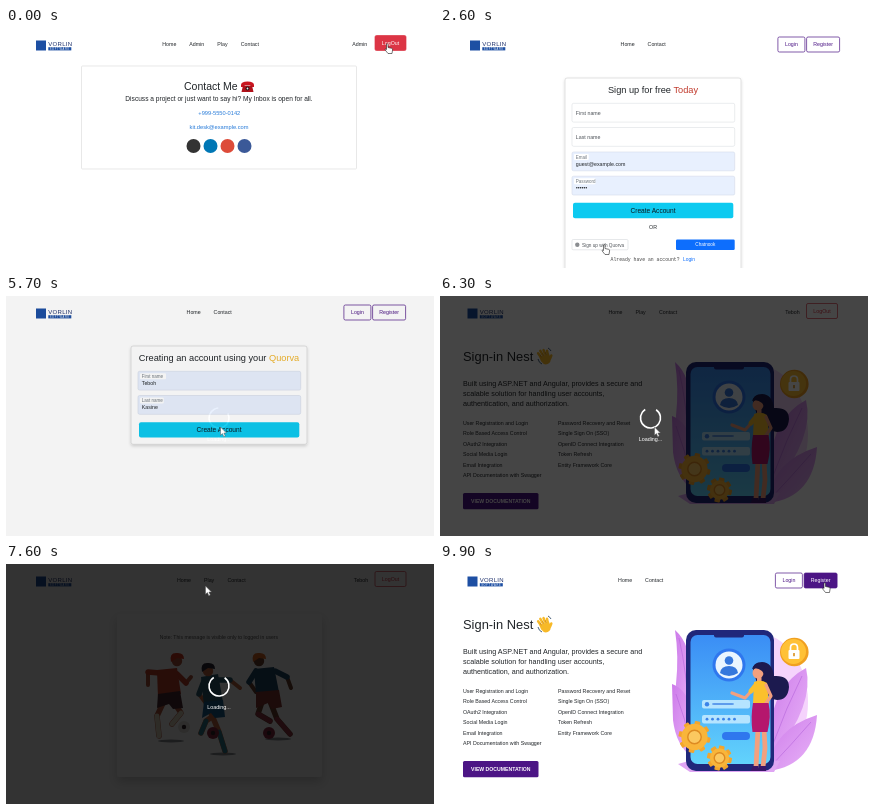
An HTML page for the animation above (10 s loop, 428 by 240 pixels).

```html
<!DOCTYPE html>
<html lang="en">
<head>
<meta charset="utf-8">
<title>Sign-up walkthrough</title>
<style>
html, body { margin: 0; width: 100%; height: 100%; overflow: hidden; background: #fff; }
svg { display: block; width: 100vw; height: 100vh; font-family: "Liberation Sans", Arial, sans-serif; }
text { white-space: pre; }
.mono { font-family: "Liberation Mono", "Courier New", monospace; }
</style>
</head>
<body>
<svg id="stage" viewBox="0 0 428 240"></svg>
<script>
const LOOP = 10000, STEP = 100, SPIN = 650;
const PURPLE = '#4c1585', RED = '#dc3545', INK = '#212529';
const BASE = 5.27;

// ---------- drawing helpers ----------
const text = (x, y, s, size = BASE, fill = INK, extra = '') =>
  `<text x="${x}" y="${y}" font-size="${size}" fill="${fill}" ${extra}>${s}</text>`;
const mid = (x, y, s, size, fill, extra = '') => text(x, y, s, size, fill, `text-anchor="middle" ${extra}`);
const box = (x, y, w, h, fill = 'none', line = 'none', r = 2, extra = '') =>
  `<rect x="${x}" y="${y}" width="${w}" height="${h}" rx="${r}" fill="${fill}" stroke="${line}" ${extra}/>`;
const dot = (x, y, r, fill, extra = '') => `<circle cx="${x}" cy="${y}" r="${r}" fill="${fill}" ${extra}/>`;
const path = (d, fill = 'none', extra = '') => `<path d="${d}" fill="${fill}" ${extra}/>`;
const limb = (pts, color, w) =>
  `<polyline points="${pts}" fill="none" stroke="${color}" stroke-width="${w}" stroke-linecap="round" stroke-linejoin="round"/>`;
const button = (x, y, w, h, label, fill, line, ink) =>
  box(x, y, w, h, fill, line, 1.5, 'stroke-width=".7"') + mid(x + w / 2, y + h / 2 + 1.9, label, BASE, ink);
const group = (id, body) => `<g id="${id}" display="none">${body}</g>`;

// ---------- header ----------
function header(links, dx = 0) {
  return `<g transform="translate(${dx} 0)">` +
    box(30, 12.5, 10, 10, '#1d4fa3', 'none', 0) +
    text(42.3, 18, 'VORLIN', 6, '#1c2f6b', 'letter-spacing=".3"') +
    box(42.3, 19.2, 23, 3.2, '#1d4fa3', 'none', 0) +
    mid(53.8, 21.8, 'SOFTWARE', 2.6, '#fff', 'letter-spacing=".7"') + '</g>' +
    links.map(([x, s]) => text(x + dx, 18.2, s)).join('');
}
const guestLinks = [[180.6, 'Home'], [207.6, 'Contact']];
const userLinks = [[171, 'Home'], [198, 'Play'], [221.5, 'Contact'], [347.8, 'Teboh']];
const adminLinks = [[156.3, 'Home'], [183.2, 'Admin'], [211.3, 'Play'], [234.8, 'Contact'], [346.3, 'Admin']];
const logout = (dx = 0) => button(369 + dx, 7.5, 31, 15, 'LogOut', 'none', RED, RED);

function guestHeader(dx = 0, fill = 'none', ink = PURPLE) {
  return header(guestLinks, dx) +
    button(337.9 + dx, 9, 27, 15, 'Login', 'none', PURPLE, PURPLE) +
    button(366.6 + dx, 9, 33, 15, 'Register', fill, PURPLE, ink);
}

// ---------- contact ----------
const phone = path('M235 57q0-3.500 6.500-3.500t6.500 3.500v2h-3.200l-.6-2h-5.400l-.6 2H235z', '#c91620') +
  path('M237 57.500h9l1.500 6.500h-12z', '#b0121b') + dot(241.5, 60.5, 2, '#2b1214') + dot(241.5, 60.5, .9, '#eee');
const contact = box(75.5, 38, 275, 103, '#fff', '#dedede', 1, 'stroke-width=".7"') +
  text(178, 62.2, 'Contact Me', 10.5) + phone +
  mid(213, 73, 'Discuss a project or just want to say hi? My Inbox is open for all.', 6.6) +
  mid(213.3, 87, '+999-5550-0142', 5.7, '#2479d8') +
  mid(213, 101.2, 'kit.desk@example.com', 5.7, '#2479d8') +
  ['#333333', '#0077b5', '#dd4b39', '#3b5998'].map((c, i) => dot(187.5 + i * 17, 118, 7, c)).join('');

// ---------- forms ----------
function field(y, label, value) {
  const full = value !== undefined;
  return box(132, y, 162.7, 18.8, full ? '#e8f0fe' : '#fff', full ? '#d3dbe9' : '#dcdfe3', 1.6, 'stroke-width=".6"') +
    (full
      ? box(134, y + 2, label.length * 2.25 + 3.5, 6, '#fff', 'none', 1) +
        text(135.8, y + 6.8, label, 4.5, '#6c757d') + text(135.8, y + 13.6, value)
      : text(135.8, y + 11.2, label, BASE, '#4c5157'));
}
const card = h => box(125, 50, 176, h, '#fff', '#d4d4d4', 2, 'stroke-width=".7" filter="url(#shade)"');
const create = y => box(133, y, 160.3, 15.4, '#0dcaf0') + mid(213, y + 10.1, 'Create Account', 6.6, '#0b1a20');
const title = (a, b, color) =>
  `<text x="213" y="64.6" font-size="9.22" fill="${INK}" text-anchor="middle">${a} <tspan fill="${color}">${b}</tspan></text>`;

const register = card(220) + title('Sign up for free', 'Today', '#c0392b') +
  field(75.3, 'First name') + field(99.5, 'Last name') +
  field(124, 'Email', 'guest@example.com') + field(148.2, 'Password', '') +
  Array.from({ length: 6 }, (_, i) => dot(136.8 + i * 1.9, 159.7, .75, INK)).join('') +
  create(174.8) + mid(213, 201.2, 'OR') +
  box(132, 211.5, 56, 10.3, '#fff', '#d5d8dc', 1.2, 'stroke-width=".6"') + dot(137.3, 216.8, 2.2, '#8a8d90') +
  text(142, 218.5, 'Sign up with Quorva', 4.7, '#50555a') +
  box(236, 211.5, 58.7, 10.5, '#0d6efd', 'none', 1.2) + mid(265.3, 218.4, 'Chatnook', 4.7, '#fff') +
  text(170.5, 233, 'Already have an account?', 4.8, '#444', 'class="mono"') +
  text(243, 233, 'Login', 4.9, '#0d6efd');

const social = card(98.3) + title('Creating an account using your', 'Quorva', '#f0b429') +
  group('first0', field(75.3, 'First name')) + group('first1', field(75.3, 'First name', 'Teboh')) +
  group('last0', field(99.5, 'Last name')) + group('last1', field(99.5, 'Last name', 'Kasine')) +
  create(126.2);

// ---------- home ----------
function gear(x, y, r) {
  const teeth = Array.from({ length: 8 }, (_, i) =>
    `<rect x="${x - 2.8}" y="${y - r}" width="5.600" height="6" rx="1" fill="#f3a52c" transform="rotate(${i * 45 + 12} ${x} ${y})"/>`);
  return teeth.join('') + dot(x, y, r - 2.8, '#f9b53a') +
    dot(x, y, r * .42, '#fbc860', 'stroke="#dd8a22" stroke-width="1.400"');
}
const leaf = (d, vein) => path(d, 'url(#leaf)') + path(vein, 'none', 'stroke="#b565dc" stroke-width=".6"');
const wave = `<g transform="rotate(-22 105 61)" stroke-linecap="round">` +
  [[101, 59, 100, 55], [103.6, 58, 103, 53.5], [106.2, 58, 106.2, 54], [108.6, 59, 109.2, 56]]
    .map(([a, b, c, d]) => `<path d="M${a} ${b}L${c} ${d}" stroke="#f7b928" stroke-width="2.500"/>`).join('') +
  path('M99.700 59h10.200v4.500q-1 5-5 5t-5.200-5z', '#f7b928') +
  path('M109 64.500l2.400-2.500', 'none', 'stroke="#f7b928" stroke-width="2.500"') +
  path('M101.500 59.500v-2M104.200 59v-2M107 59v-2', 'none', 'stroke="#b97012" stroke-width=".5"') + '</g>' +
  path('M98 63q1 4 4 5M111 55q-1-2-3-3', 'none', 'stroke="#35506b" stroke-width=".9"');

const woman =
  limb('318,164 317,184 316,203', '#f2a07f', 4.8) + limb('324,164 325,184 323,203', '#f2a07f', 4.8) +
  path('M313 202h5.500v5h-8zM320 202h6v5h-8z', '#3c1768') +
  path('M313 106q0-8 9-8 10 0 12 14 15-1 15 11-1 13-12 13-9 0-11-11l-9-6z', '#1c1a4f') +
  limb('316,122 305,134 292,129', '#f2a07f', 3.2) + dot(318, 109, 5.5, '#f2a07f') + box(317, 112, 4.5, 7, '#f2a07f') +
  path('M312 105q2-7 9-6 5 2 5 14l-4-6q-5-4-10-2z', '#1c1a4f') +
  path('M314 118q7-3 13 1l2 21h-16z', '#fbc02d') + limb('316,121 311,127', '#fbc02d', 5) +
  limb('326,121 331,132 324,142', '#f2a07f', 3.2) +
  path('M313 139h15.500q3 13-1 29h-15q-2-15 .5-29z', '#b5176d');

const art =
  '<ellipse cx="316" cy="138" rx="52" ry="69" fill="#f5d3fc"/>' +
  leaf('M235 66q16 14 16 46v50q-15-12-15-42 3-28-1-54z', 'M239 74q8 35 10 78') +
  leaf('M232 120q17 6 20 32l1 42q-17-12-20-38z', 'M236 130q10 25 14 52') +
  leaf('M330 166q4-45 36-62 9 36-32 88z', 'M362 112q-16 32-29 68') +
  leaf('M328 204q5-39 49-53-3 50-48 56z', 'M371 158q-20 23-40 44') +
  path('M238 200q34-12 102-3l-6 11h-84z', '#dfa5f3') +
  box(246, 66, 88, 141, '#20277a', 'none', 10) + box(250.5, 71, 80, 129, 'url(#screen)', 'none', 7) +
  box(274, 69, 30, 4.5, '#20277a') +
  dot(289, 101, 16.5, '#2f77ee') + dot(289, 101, 13.5, '#eaf5ff') + dot(289, 96.5, 4.3, '#3577dc') +
  path('M280 109q1-7 9-7t9 7q-9 6-18 0z', '#3577dc') +
  box(262, 136, 48, 8.5, '#b5e4ff') + dot(267, 140.2, 2.2, '#3b83e8') + box(272, 139, 22, 2, '#5e9cec') +
  box(262, 151, 48, 8.5, '#b5e4ff') +
  Array.from({ length: 6 }, (_, i) => dot(267 + i * 5.5, 155.2, 1.4, '#3b83e8')).join('') +
  box(282, 168, 28, 8, '#2f77ee', 'none', 4) +
  dot(354.3, 88, 14.3, '#f0a021') + dot(353.5, 87.5, 12.5, '#ffc136') +
  path('M350.500 87v-3.500q0-3.500 3.500-3.500t3.500 3.500V87', 'none', 'stroke="#fff" stroke-width="1.700"') +
  box(348.5, 86, 11, 9, '#fff', 'none', 1) + box(353.2, 89, 1.6, 3.2, '#d78d18', 'none', .5) +
  gear(254.5, 173, 16) + gear(279.5, 194, 12.5) + woman;

const features = [
  ['User Registration and Login', 'Role Based Access Control', 'OAuth2 Integration',
    'Social Media Login', 'Email Integration', 'API Documentation with Swagger'],
  ['Password Recovery and Reset', 'Single Sign On (SSO)', 'OpenID Connect Integration',
    'Token Refresh', 'Entity Framework Core']
];
const home = text(23, 65, 'Sign-in Nest', 12.9) + wave +
  ['Built using ASP.NET and Angular, provides a secure and',
    'scalable solution for handling user accounts,', 'authentication, and authorization.']
    .map((s, i) => text(23, 90.2 + i * 9.7, s, 7.2)).join('') +
  features.map((col, c) => col.map((s, i) => text(23 + c * 95, 128.7 + i * 10.5, s)).join('')).join('') +
  box(23, 197, 75.5, 16.3, PURPLE, 'none', 1.5) +
  mid(60.8, 207, 'VIEW DOCUMENTATION', 5.15, '#fff', 'font-weight="bold"') + art;

// ---------- play ----------
function player(p) {
  const [hx, hy] = p.head;
  const part = (s, from, to) => s.split(' ').slice(from, to).join(' ');
  return `<ellipse cx="${p.foot}" cy="${p.ground}" rx="13" ry="1.500" fill="#8d9096"/>` +
    p.legs.map(l => limb(l, p.skin, 5.5) + limb(part(l, 1), p.sock, 4.8) + limb(part(l, 2), '#222', 5)).join('') +
    p.arms.map(a => limb(a, p.skin, 4) + limb(part(a, 0, 2), p.shirt, 5.5)).join('') +
    path(p.body, p.shirt) + path(p.shorts, p.pants) +
    dot(hx, hy, 5.2, p.skin) +
    path(`M${hx - 6} ${hy + 1}q-2-9 5-9 8-1 8 6l-7-1z`, p.hair) +
    dot(...p.ball, 6, p.ballColor) + dot(...p.ball, 2.2, '#33252a');
}
const play = box(111, 50, 205, 163, '#fff', 'none', 3, 'filter="url(#lift)"') +
  mid(213, 75, 'Note: This message is visible only to logged in users', 5.1, '#555') +
  player({ foot: 165, ground: 177, skin: '#b5553a', sock: '#e9dcc4', shirt: '#c73f29', pants: '#4a2a33', hair: '#d8361d',
    legs: ['158,137 151,152 153,172', '167,137 175,149 166,160'], arms: ['154,109 142,108 142,121', '171,110 180,119 185,113'],
    body: 'M151 106l20-2 4 26-23 4z', shorts: 'M152 130l22-3 3 17-10 1-4-5-12 4z', head: [171, 97], ball: [178, 163], ballColor: '#e6e3dc' }) +
  player({ foot: 217, ground: 190, skin: '#c9683f', sock: '#2f7f94', shirt: '#2b5f74', pants: '#1a6296', hair: '#292332',
    legs: ['205,149 213,168 219,187', '213,148 200,157 195,169'], arms: ['198,117 193,130 199,138', '212,116 224,116 234,124'],
    body: 'M195 113l17-3 5 28-19 4z', shorts: 'M198 138l19-2 2 17-10 1-4-5-9 5z', head: [202, 107], ball: [207, 169], ballColor: '#8f2740' }) +
  player({ foot: 272, ground: 175, skin: '#6e3f2b', sock: '#9e3745', shirt: '#1f4a6b', pants: '#8c3530', hair: '#e16a25',
    legs: ['264,137 271,155 284,170', '256,138 252,150 264,157'], arms: ['250,107 243,118 250,128', '269,107 281,113 285,124'],
    body: 'M248 105l20-2 5 25-23 3z', shorts: 'M250 128l23-2 3 17-10 2-4-6-12 5z', head: [253, 97], ball: [263, 169], ballColor: '#8f2740' });

// ---------- stage ----------
const stage = document.getElementById('stage');
stage.innerHTML = `<defs>
  <linearGradient id="screen" x2="0" y2="1"><stop stop-color="#3a8df5"/><stop offset="1" stop-color="#62d3fc"/></linearGradient>
  <linearGradient id="leaf" x2="1" y2="1"><stop stop-color="#cd7bea"/><stop offset="1" stop-color="#e9b4f8"/></linearGradient>
  <filter id="shade" x="-10%" y="-10%" width="120%" height="125%"><feDropShadow dx="0" dy="1.500" stdDeviation="1.800" flood-opacity=".16"/></filter>
  <filter id="lift" x="-15%" y="-15%" width="130%" height="135%"><feDropShadow dx="0" dy="5" stdDeviation="5" flood-opacity=".175"/></filter>
  </defs><rect width="428" height="240" fill="#fff"/>` +
  group('adminContact', header(adminLinks) + button(369, 7.5, 31, 15, 'LogOut', RED, RED, '#fff') + contact) +
  group('guestHome', guestHeader(-2.5, PURPLE, '#fff') + home) +
  group('register', guestHeader() + `<g id="fading">${button(366.6, 9, 33, 15, 'Register', PURPLE, PURPLE, PURPLE)}</g>` + register) +
  group('social', guestHeader() + social) +
  group('userHome', header(userLinks, -2.5) + logout(-2.5) + home) +
  group('play', header(userLinks) + logout() + play) +
  group('userContact', header(userLinks) + logout() + contact) +
  `<g id="veil"><rect width="428" height="240" opacity=".8"/><g id="busy">
    <circle id="ring" r="10" fill="none" stroke="#fff" stroke-width="1.600" stroke-dasharray="51 11.830"/>
    ${mid(0, 22.5, 'Loading...', 5.4, '#fff')}</g></g>` +
  '<g id="cursor" stroke-linejoin="round">' +
  group('arrow', path('M0 0v8.300l1.900-1.700 1.400 3.100 1.500-.700-1.400-3h2.600z', '#fff', 'stroke="#555" stroke-width=".5"')) +
  group('hand', path('M1.500 1q1.200-.800 1.500.500v3l3.600.8q1.200.300 1 1.600l-.600 3.600H3L.2 7q-.4-1.200.7-1l.6.500z', '#fff', 'stroke="#222" stroke-width=".6"')) + '</g>';

const $ = id => document.getElementById(id);
const show = (id, on) => $(id).setAttribute('display', on ? 'inline' : 'none');

const scenes = [[0, 'adminContact'], [200, 'guestHome'], [1000, 'register'], [3500, 'social'],
  [6000, 'userHome'], [7400, 'play'], [8600, 'userContact'], [9600, 'guestHome']];
const veil = [[0, 0], [5600, 0], [5700, .06], [5900, .9], [6000, 1], [6200, 1], [6300, .91], [6600, 0],
  [7200, 0], [7500, 1], [7900, 1], [8200, 0], [10000, 0]];
// time, x, y, shape
const moves = [[0, 379, 15, 'hand'], [300, 382.5, 18, 'hand'], [1100, 382.5, 18, ''], [1500, 330, 110, 'arrow'],
  [2000, 162, 216, 'hand'], [3000, 162, 216, 'arrow'], [3700, 342, 109, 'arrow'], [4100, 342, 109, 'arrow'],
  [4600, 190, 86, 'arrow'], [4800, 190, 86, 'arrow'], [5100, 190, 110, 'arrow'], [5200, 190, 110, 'arrow'],
  [5500, 214.5, 131, 'arrow'], [6700, 214.5, 131, 'arrow'], [7100, 199.5, 22, 'arrow'], [8200, 199.5, 22, 'arrow'],
  [8500, 231, 17, 'hand'], [8800, 231, 17, 'arrow'], [9400, 382.5, 18, 'hand'], [10000, 382.5, 18, 'hand']];

function sample(table, t) {
  let i = table.length - 1;
  while (i > 0 && table[i][0] > t) i--;
  const a = table[i], b = table[i + 1] || a;
  return { a, b, k: b === a ? 0 : (t - a[0]) / (b[0] - a[0]) };
}
const mix = (a, b, k) => a + (b - a) * k;

function draw(t) {
  const scene = sample(scenes, t).a[1];
  new Set(scenes.map(s => s[1])).forEach(id => show(id, id === scene));
  $('fading').setAttribute('opacity', t < 1200 ? .35 : t < 1400 ? .08 : 0);

  for (const [name, at] of [['first', 4800], ['last', 5200]]) {
    show(name + '0', t < at);
    show(name + '1', t >= at);
  }

  const v = sample(veil, t);
  $('veil').setAttribute('opacity', mix(v.a[1], v.b[1], v.k));
  $('busy').setAttribute('transform', `translate(${scene === 'userHome' ? 210.5 : 213} 122)`);
  $('ring').setAttribute('transform', `rotate(${t % SPIN / SPIN * 360 + 55})`);

  const m = sample(moves, t), k = m.k * m.k * (3 - 2 * m.k);
  $('cursor').setAttribute('transform', `translate(${mix(m.a[1], m.b[1], k)} ${mix(m.a[2], m.b[2], k)})`);
  show('arrow', m.a[3] === 'arrow');
  show('hand', m.a[3] === 'hand');
}

const start = performance.now();
function tick() {
  const t = (performance.now() - start) % LOOP;
  draw(Math.floor(t / STEP) * STEP);
  requestAnimationFrame(tick);
}
draw(0);
requestAnimationFrame(tick);
</script>
</body>
</html>
```
